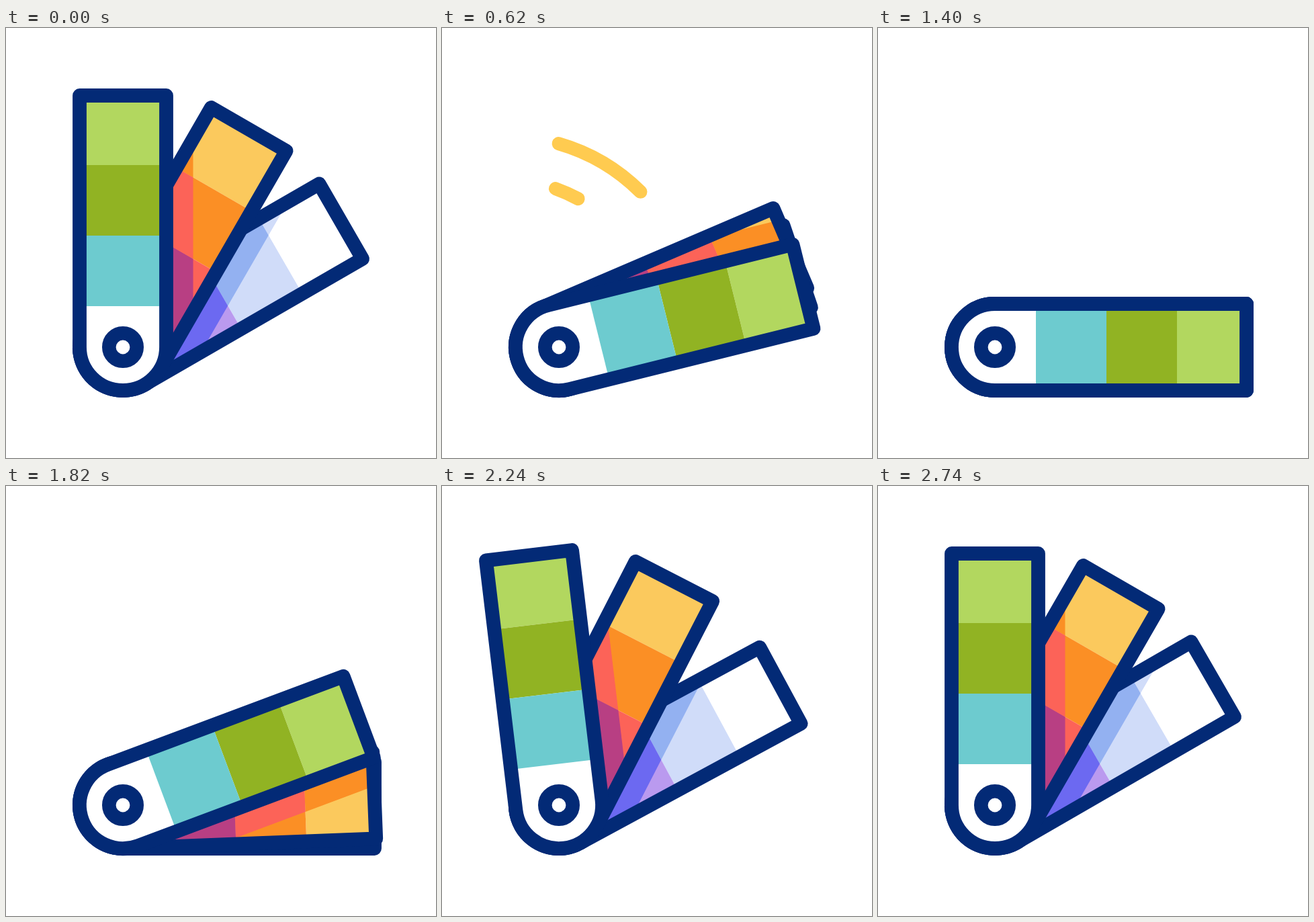
An HTML page with a canvas for the animation above (3 s loop, 640 by 640 pixels).

```html
<!DOCTYPE html>
<html lang="en">
<head>
<meta charset="utf-8">
<title>Colour swatches</title>
<style>
  html, body { margin: 0; width: 100%; height: 100%; overflow: hidden; background: #fff; }
  canvas { display: block; width: 100vw; height: 100vh; }
</style>
</head>
<body>
<canvas id="stage" width="640" height="640"></canvas>
<script>
const ctx = document.getElementById('stage').getContext('2d');
const LOOP = 3000, STEP = 20;
const PIVOT = { x: 174, y: 475 };
const HALF = 64.5, TOP = -374.5, LINE = 20.8, SHADE_HALF = 104.5;
const BANDS = [-380, -271, -166, -61];
const NAVY = '#032a76', YELLOW = '#ffcb50';

// Back to front; each later card tints the one beneath it.
const cards = [
  { rest: 60, past: 54, open: 400, close: 1860, end: -20,
    colors: ['#ffffff', '#d0dcf9', '#ba9aef'], shaded: ['#d0dcf9', '#93b1f1', '#6c69f1'] },
  { rest: 30, past: 25, open: 300, close: 1760, end: -20,
    colors: ['#fbc95d', '#fb8f25', '#fc6358'], shaded: ['#fb8f25', '#fc6358', '#b83f83'] },
  { rest: 0, past: -7.1, open: 200, close: 1660, end: -61,
    colors: ['#b2d75f', '#91b323', '#6dcbcf'] }
];

// Arcs around their own centres; angles in degrees clockwise from straight up.
const swooshes = [
  { x: 95, y: 445, r: 284, from: -4, to: 44.9, head: [200, 600], tail: [400, 900] },
  { x: 88, y: 465, r: 240, from: 19.7, to: 61.2, head: [510, 880], tail: [700, 1100] }
];

const rad = deg => deg * Math.PI / 180;

function ease(t, start, end) {
  const p = Math.min(1, Math.max(0, (t - start) / (end - start)));
  return p * p * (3 - 2 * p);
}

function cardAngle(card, t) {
  const { rest, past, open, close } = card;
  const over = 97;
  return rest
    + (over - rest) * ease(t, open, open + 600)
    + (90 - over) * ease(t, open + 600, open + 1000)
    + (past - 90) * ease(t, close, close + 540)
    + (rest - past) * ease(t, close + 540, close + 880);
}

function cardPath() {
  ctx.beginPath();
  ctx.moveTo(-HALF, 0);
  ctx.lineTo(-HALF, TOP);
  ctx.lineTo(HALF, TOP);
  ctx.lineTo(HALF, 0);
  ctx.arc(0, 0, HALF, 0, Math.PI);
  ctx.closePath();
}

function fillBands(colors, end) {
  colors.forEach((color, i) => {
    const bottom = i === 2 ? end : BANDS[i + 1];
    ctx.fillStyle = color;
    ctx.fillRect(-HALF, BANDS[i], HALF * 2, bottom - BANDS[i]);
  });
}

function drawCard(card, angle, upperAngle) {
  ctx.save();
  ctx.translate(PIVOT.x, PIVOT.y);
  ctx.rotate(rad(angle));

  ctx.save();
  cardPath();
  ctx.fillStyle = '#fff';
  ctx.fill();
  ctx.clip();
  fillBands(card.colors, card.end);
  if (card.shaded) {
    const turn = rad(upperAngle - angle);
    ctx.rotate(turn);
    ctx.beginPath();
    ctx.rect(-SHADE_HALF, -600, SHADE_HALF * 2, 1200);
    ctx.clip();
    ctx.rotate(-turn);
    fillBands(card.shaded, card.end);
  }
  ctx.restore();

  cardPath();
  ctx.lineWidth = LINE;
  ctx.lineJoin = 'round';
  ctx.strokeStyle = NAVY;
  ctx.stroke();
  ctx.restore();
}

function drawSwoosh(s, t) {
  const at = span => s.from + (s.to - s.from) * ease(t, ...span);
  const head = at(s.head), tail = at(s.tail);
  if (head - tail < 0.01) return;
  ctx.beginPath();
  ctx.arc(s.x, s.y, s.r, rad(tail - 90), rad(head - 90));
  ctx.lineWidth = 20;
  ctx.lineCap = 'round';
  ctx.strokeStyle = YELLOW;
  ctx.stroke();
}

function drawRivet() {
  ctx.beginPath();
  ctx.arc(PIVOT.x, PIVOT.y, 20.7, 0, Math.PI * 2);
  ctx.lineWidth = 20.6;
  ctx.strokeStyle = NAVY;
  ctx.stroke();
}

function draw(t) {
  ctx.fillStyle = '#fff';
  ctx.fillRect(0, 0, 640, 640);
  swooshes.forEach(s => drawSwoosh(s, t));
  const angles = cards.map(card => cardAngle(card, t));
  cards.forEach((card, i) => drawCard(card, angles[i], angles[i + 1]));
  drawRivet();
}

const began = performance.now();
function tick() {
  const t = (performance.now() - began) % LOOP;
  draw(Math.floor(t / STEP) * STEP);
  requestAnimationFrame(tick);
}
tick();
</script>
</body>
</html>
```
